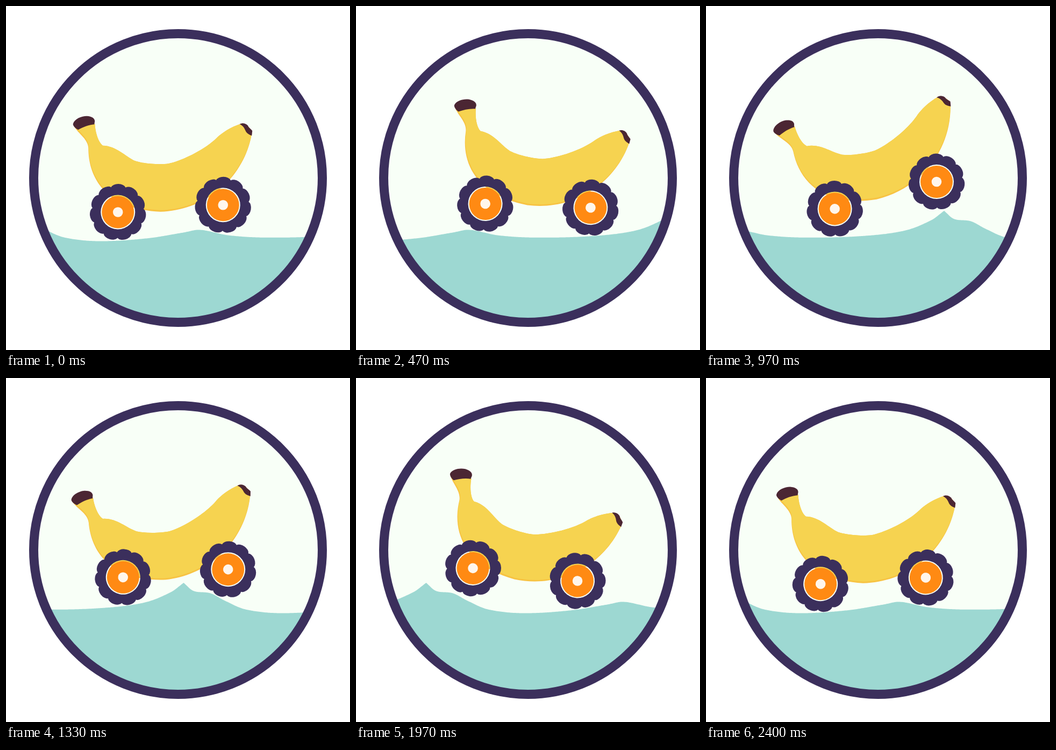
An HTML page that plays this animation: 640 px wide and 640 px high, repeating every 2430 ms.

```html
<!DOCTYPE html>
<html lang="en">
<head>
<meta charset="utf-8">
<title>Banana car</title>
<style>
  html, body { margin: 0; width: 100%; height: 100%; overflow: hidden; background: #fff; }
  svg { display: block; width: 100%; height: 100%; }
</style>
</head>
<body>
<svg viewBox="0 0 640 640">
  <defs>
    <clipPath id="window"><circle cx="320" cy="320" r="268"/></clipPath>
    <path id="peel" d="M128 220C133 235 155 245 156 264C156 322 191 378 290 382.5C375 380 445 320 460 238
      C461 230 450 217 441 218.5C420 225 405 236 397 243C375 266 330 288 305 293
      C290 295 262 294 243 288C225 280 208 260 183 259.5C175 254 169 236 168 219Z"/>
    <clipPath id="peelClip"><use href="#peel"/></clipPath>
    <g id="wheel">
      <path id="tyre" fill="#3b2f5c" fill-rule="evenodd"/>
      <circle r="30" fill="#ff8a13"/>
      <circle r="9.3" fill="#fff6ec"/>
    </g>
  </defs>
  <g clip-path="url(#window)">
    <rect width="640" height="640" fill="#f8fff7"/>
    <path id="water" fill="#9dd8d2"/>
    <g id="body">
      <use href="#peel" fill="#f7c343"/>
      <g clip-path="url(#peelClip)"><use href="#peel" x=".5" y="-3" fill="#f6d350"/></g>
      <path fill="#4b2633" d="M127.5 219C130 210 143 204.5 153 204.5C163 205 168 209 168 214L167 220
        C156 221 146 225 137 230C131 227 127 222 127.5 219Z"/>
      <path fill="#4b2633" d="M437.5 219.5C443 216.5 449 218 453 222.5C454 226 458 228 461 232L460 241
        C453 238 450 236 448 231C446 226 443 222 437.5 219.5Z"/>
    </g>
    <use id="rear" href="#wheel"/>
    <use id="front" href="#wheel"/>
  </g>
  <circle cx="320" cy="320" r="268.5" fill="none" stroke="#3b2f5c" stroke-width="17"/>
</svg>
<script>
const LOOP = 2430, PERIOD = 750, SPEED = 12.5, CREST = 743, RADIUS = 53, WHEELBASE = 196;
const DEG = Math.PI / 180;
const el = id => document.getElementById(id);
const mod = (a, b) => (a % b + b) % b;

// One wave from crest to crest: [distance, y]
const wave = [
  [0, 381], [18, 396], [50, 400.5], [77, 414.5], [115, 430.5], [180, 437.5], [270, 432.2], [337, 421.5],
  [368, 416.5], [420, 426.5], [490, 430.8], [597, 428], [677, 417.8], [726, 398.5], [750, 381]
];

// Key poses: [step, car x, body lift above axles, body tilt against axles]
const poses = [
  [0, 306, 46.6, 3.9], [12, 338.5, 50.5, 6.6], [24, 334.3, 47.2, 3.3], [33, 315.5, 41.3, -.6],
  [42, 310.5, 37.1, 4.4], [49, 314.8, 38.4, 6.7], [60, 311, 48, 3.9]
];

// Smooth curve through the keys
function spline(keys, x, col) {
  const last = keys.length - 1;
  let i = 0;
  while (i < last - 1 && keys[i + 1][0] <= x) i++;
  const slope = j => {
    const a = keys[Math.max(j - 1, 0)], b = keys[Math.min(j + 1, last)];
    return (b[col] - a[col]) / (b[0] - a[0]);
  };
  const p = keys[i], q = keys[i + 1], w = q[0] - p[0], s = (x - p[0]) / w, r = 1 - s;
  return r * r * (1 + 2 * s) * p[col] + s * s * (3 - 2 * s) * q[col]
    + w * s * r * (r * slope(i) - s * slope(i + 1));
}

const seaY = d => spline(wave, mod(d, PERIOD), 1);

// Axle height of a tyre resting on the sea
function restY(x, step) {
  const d = x + SPEED * step - CREST;
  let y = Infinity;
  for (let o = -52; o <= 52; o += 2)
    y = Math.min(y, seaY(d + o) - Math.sqrt(RADIUS * RADIUS - o * o));
  return y;
}

// Ballistic hop off the crest
const hopY = (step, topStep, topY) => topY + 1.4 * (step - topStep) ** 2;

// The springs rebound when the rear wheel meets the crest
const bounce = k => 6 * Math.sin(.45 * k) * Math.exp(-((k / 6) ** 2));

// Scalloped rim with a round hole
function buildTyre() {
  const lobes = 11, notch = 48;
  let d = "M32 0A32 32 0 1 0 -32 0A32 32 0 1 0 32 0Z";
  for (let i = 0; i <= lobes; i++) {
    const a = (i - .5) * 360 / lobes;
    const end = `${notch * Math.sin(a * DEG)} ${-notch * Math.cos(a * DEG)}`;
    d += i ? `A14 8.7 ${a - 180 / lobes} 0 1 ${end}` : `M${end}`;
  }
  el("tyre").setAttribute("d", d + "Z");
}

function buildWater() {
  let d = "M0 640";
  for (let x = 0; x <= 2 * PERIOD; x += 2) d += `L${x} ${seaY(x).toFixed(2)}`;
  el("water").setAttribute("d", d + "V640Z");
}

const place = (id, x, y, angle = 0, pivot = "") =>
  el(id).setAttribute("transform", `translate(${x} ${y}) rotate(${angle}) ${pivot}`);

function draw(ms) {
  // 25 steps a second shown on a 30 Hz grid
  const step = Math.floor((Math.floor(ms * .03 + .15) + .5) / 1.2);
  const [x, lift, tilt] = [1, 2, 3].map(col => spline(poses, step, col));

  const rearY = Math.min(restY(x - 96, step), hopY(step, 44, 318.9));
  const frontY = Math.min(restY(x + 96, step), hopY(step, 25, 325.6));
  const slope = Math.asin((frontY - rearY) / WHEELBASE);
  const half = WHEELBASE / 2 * Math.cos(slope);
  const roll = 1 + 1.09 * (SPEED * step + x - 306);
  const angle = slope / DEG + tilt;

  place("water", CREST - PERIOD - SPEED * step, 0);
  place("rear", x - half, rearY, roll);
  place("front", x + half, frontY, roll);
  place("body", x - 2.8 + 45 * Math.sin(angle * DEG),
    (rearY + frontY) / 2 - lift - bounce(step - 42), angle, "translate(-306 -330)");
}

buildTyre();
buildWater();
const start = performance.now();
function tick() {
  draw((performance.now() - start) % LOOP);
  requestAnimationFrame(tick);
}
tick();
</script>
</body>
</html>
```
